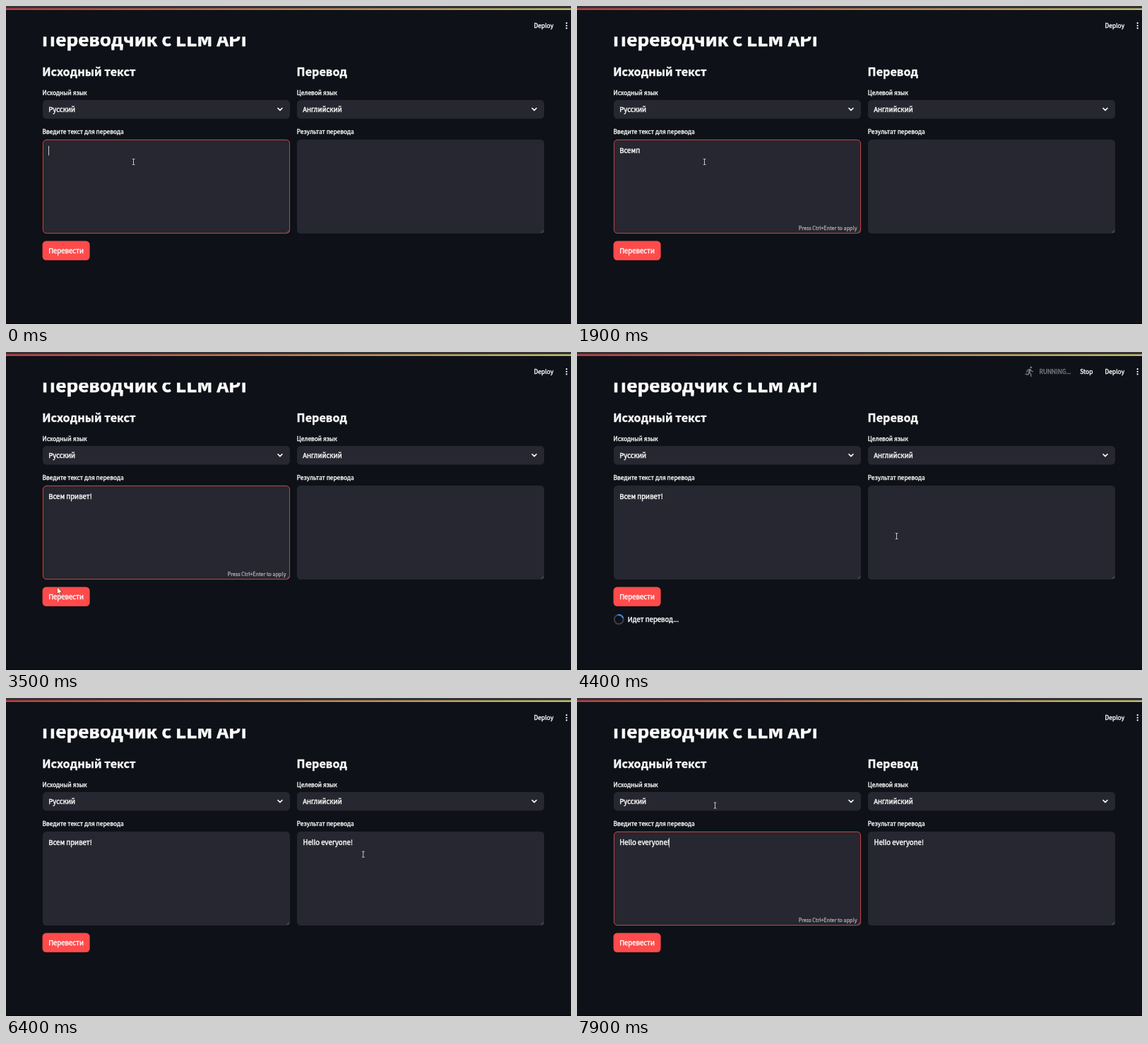
Recreate the animation shown at these times as an HTML page with a canvas. Size 800 by 450 pixels, loop 8 s.

```html
<!DOCTYPE html>
<html lang="ru">
<head>
<meta charset="utf-8">
<title>Переводчик</title>
<style>
html, body { margin: 0; width: 100%; height: 100%; overflow: hidden; background: #0e1117; }
canvas { display: block; width: 800px; height: 450px; }
</style>
</head>
<body>
<canvas id="stage" width="800" height="450"></canvas>
<script>
const ctx = document.getElementById('stage').getContext('2d');
const LOOP = 8000, BLINK = 530;
const BG = '#0e1117', PANEL = '#262730', RED = '#ff4b4b', WHITE = '#fafafa', GRAY = '#7b7d82';
const REM = 10.8;

const NARROW = '"Noto Sans CJK JP", "Noto Sans CJK SC", "Noto Sans CJK KR", sans-serif';
const PLAIN = '"Noto Sans", "Open Sans", sans-serif';

// Picks a family and evens out its size so 1em means the same everywhere.
function face(weight, sample, ems, stroke) {
  const measure = family => {
    ctx.font = `${weight} 100px ${family}`;
    return ctx.measureText(sample).width / 100;
  };
  let family = NARROW, width = measure(family);
  if (width > ems * 1.3) {
    family = PLAIN;
    width = measure(family);
  }
  return { weight, family, stroke, scale: ems / width };
}
const latin = face(500, 'Hello everyone!', 6.547, 0.04);
const cyrillic = face(500, 'Всем привет!', 5.7, 0.04);
const bold = face(700, 'Исходный текст', 7.01, 0.022);

// A fine outline gives the slightly heavier weight of the interface text.
function text(str, x, y, size = REM, color = WHITE, strong = false, align = 'left') {
  const f = strong ? bold : /[а-яё]/i.test(str) ? cyrillic : latin;
  ctx.font = `${f.weight} ${size * f.scale}px ${f.family}`;
  ctx.fillStyle = ctx.strokeStyle = color;
  ctx.lineWidth = size * f.stroke;
  ctx.lineJoin = 'round';
  ctx.textAlign = align;
  ctx.fillText(str, x, y);
  ctx.strokeText(str, x, y);
  return ctx.measureText(str).width;
}

function box(x, y, w, h, color, glow = 0) {
  ctx.beginPath();
  ctx.roundRect(x, y, w, h, 5.2);
  ctx.fillStyle = color;
  ctx.fill();
  if (glow > 0) {
    ctx.beginPath();
    ctx.roundRect(x + 0.4, y + 0.4, w - 0.8, h - 0.8, 5);
    ctx.strokeStyle = `rgba(228, 72, 74, ${glow})`;
    ctx.lineWidth = 0.9;
    ctx.stroke();
  }
}

function line(points, color, width) {
  ctx.beginPath();
  points.forEach(([x, y]) => ctx.lineTo(x, y));
  ctx.strokeStyle = color;
  ctx.lineWidth = width;
  ctx.lineCap = ctx.lineJoin = 'round';
  ctx.stroke();
}

function dot(x, y, r, color) {
  ctx.beginPath();
  ctx.arc(x, y, r, 0, Math.PI * 2);
  ctx.fillStyle = color;
  ctx.fill();
}

// Each entry: time, text in the left field
const typed = [
  [0, ''], [200, 'В'], [500, 'Вс'], [950, 'Все'], [1050, 'Всем'], [1100, 'Всемп'],
  [1170, 'Всемпр'], [1230, 'Всемпри'], [1300, 'Всемпр'], [1360, 'Всемп'],
  [1950, 'Всем'], [2080, 'Всем '], [2200, 'Всем п'], [2300, 'Всем пр'],
  [2400, 'Всем при'], [2500, 'Всем прив'], [2600, 'Всем приве'],
  [2700, 'Всем привет'], [2800, 'Всем привет!'], [7050, 'Всем привет!'],
  [7600, 'Hello everyone!']
];

// Each entry: time, x, y
const path = [
  [0, 180.5, 220.5], [2850, 180.5, 220.5], [3450, 72.5, 333], [3750, 72.5, 333],
  [4300, 452.5, 260.5], [4700, 452.5, 260.5], [5400, 515, 224.5], [6300, 515, 224.5],
  [6600, 480, 212], [6700, 480, 212], [7030, 260, 216.5], [7350, 260, 216.5],
  [7850, 195.5, 152], [LOOP, 195.5, 152]
];

function mouseAt(t) {
  const i = path.findIndex(p => p[0] > t);
  const [t0, x0, y0] = path[i - 1], [t1, x1, y1] = path[i];
  const u = (t - t0) / (t1 - t0), e = u * u * (3 - 2 * u);
  return [x0 + (x1 - x0) * e, y0 + (y1 - y0) * e];
}

const between = (t, a, b) => t >= a && t < b;
const ramp = (t, a, b) => Math.min(1, Math.max(0, (t - a) / (b - a)));

function select(x, label) {
  box(x, 133, 350, 26.5, PANEL);
  text(label, x + 8.2, 150);
  const cx = x + 336, cy = 146;
  line([[cx - 3, cy - 1.4], [cx, cy + 1.6], [cx + 3, cy - 1.4]], WHITE, 1.5);
}

function area(x, glow) {
  box(x, 189, 350, 133, PANEL, glow);
  line([[x + 346, 320.5], [x + 349, 317.5]], '#85868c', 0.6);
  line([[x + 348, 320.5], [x + 349, 319.5]], '#85868c', 0.6);
}

function runner() {
  dot(642.8, 21.8, 1.4, GRAY);
  line([[641.2, 25], [640.2, 29]], GRAY, 2.5);
  line([[640.8, 24.4], [637.6, 25.8], [637, 28.4]], GRAY, 1.3);
  line([[642, 25], [643.5, 27], [645.6, 27.6]], GRAY, 1.3);
  line([[640.4, 29], [642.6, 31], [642.8, 34.5]], GRAY, 1.4);
  line([[639.8, 29.4], [639, 32], [635.2, 31.3]], GRAY, 1.4);
}

function spinner(t) {
  const turn = ((t - 4400) / 1000 + 30 / 360) * Math.PI * 2 - Math.PI / 2;
  const ring = (from, to, color) => {
    ctx.beginPath();
    ctx.arc(59.2, 378.4, 6.4, from, to);
    ctx.strokeStyle = color;
    ctx.lineWidth = 2;
    ctx.lineCap = 'butt';
    ctx.stroke();
  };
  ring(0, Math.PI * 2, '#3d4047');
  ring(turn - Math.PI / 4, turn + Math.PI / 4, '#3b8be8');
  text('Идет перевод...', 71.8, 382);
}

function header(running) {
  ctx.fillStyle = BG;
  ctx.fillRect(0, 0, 800, 43.4);
  ctx.fillStyle = '#35363a';
  ctx.fillRect(0, 0, 800, 3.4);
  const g = ctx.createLinearGradient(0, 0, 800, 0);
  g.addColorStop(0, '#f44a4b');
  g.addColorStop(1, '#f2ee80');
  ctx.fillStyle = g;
  ctx.fillRect(0, 3.5, 800, 1.9);
  text('Deploy', 747.5, 31, 9.45);
  [24.2, 27.8, 31.4].forEach(y => dot(793.7, y, 1.15, WHITE));
  if (running) {
    runner();
    text('RUNNING...', 654.6, 31, 9.45, GRAY);
    text('Stop', 712.2, 31, 9.45);
  }
}

function cursor([x, y]) {
  const inField = (between(x, 52, 402) || between(x, 412, 762)) &&
    (between(y, 133, 160) || between(y, 189, 322));
  if (inField) {
    const ink = '#d9d9dc';
    line([[x, y - 3.5], [x, y + 3.5]], ink, 0.9);
    line([[x - 1.6, y - 4], [x + 1.6, y - 4]], ink, 0.8);
    line([[x - 1.6, y + 4], [x + 1.6, y + 4]], ink, 0.8);
    return;
  }
  const shape = [[0, 0], [0, 9.6], [2.2, 7.6], [3.6, 10.8], [5, 10.2], [3.6, 7], [6.6, 6.8]];
  ctx.beginPath();
  shape.forEach(([dx, dy]) => ctx.lineTo(x + dx, y + dy));
  ctx.closePath();
  ctx.fillStyle = '#fff';
  ctx.fill();
  ctx.strokeStyle = '#222';
  ctx.lineWidth = 0.5;
  ctx.stroke();
}

function draw(t) {
  const running = between(t, 3850, 6100);
  const leftFocus = t < 3700 || t >= 7050;
  const leftGlow = t < 3700 ? 1 : ramp(t, 7100, 7250);
  const rightGlow = ramp(t, 6600, 6750) * (1 - ramp(t, 7050, 7220));
  const [keyTime, value] = typed.filter(k => k[0] <= t).pop();
  const caretOn = Math.floor((t - keyTime) / BLINK) % 2 === 0;
  const unsaved = between(t, 200, 3700) || t >= 7600;

  ctx.fillStyle = BG;
  ctx.fillRect(0, 0, 800, 450);
  ctx.fillStyle = '#08060a';
  ctx.fillRect(0, 449, 800, 1);

  text('Переводчик с LLM API', 50.8, 57, 30.5, WHITE, true);
  text('Исходный текст', 51.2, 99.2, 18.9, WHITE, true);
  text('Перевод', 411.6, 99.2, 18.9, WHITE, true);
  text('Исходный язык', 51.6, 125.6, 9.45);
  text('Целевой язык', 411.8, 125.6, 9.45);
  select(52, 'Русский');
  select(412, 'Английский');
  text('Введите текст для перевода', 51.6, 181.2, 9.45);
  text('Результат перевода', 411.8, 181.2, 9.45);

  area(52, leftGlow);
  area(412, rightGlow);
  const width = text(value, 60.2, 208.4);
  if (leftFocus && caretOn) {
    ctx.fillStyle = '#dcdcde';
    ctx.fillRect(Math.round(60.2 + width - 0.4), 198, 0.9, 13.5);
  }
  if (unsaved) text('Press Ctrl+Enter to apply', 396.4, 317.4, 8.1, '#a5a5aa', false, 'right');
  if (t >= 6100) text('Hello everyone!', 420.4, 208.4);

  box(51.6, 332.5, 67, 27.2, RED);
  text('Перевести', 60.2, 350);
  if (running) spinner(t);

  header(running);
  cursor(mouseAt(t));
}

const start = performance.now();
function tick() {
  draw((performance.now() - start) % LOOP);
  requestAnimationFrame(tick);
}
tick();
</script>
</body>
</html>
```
